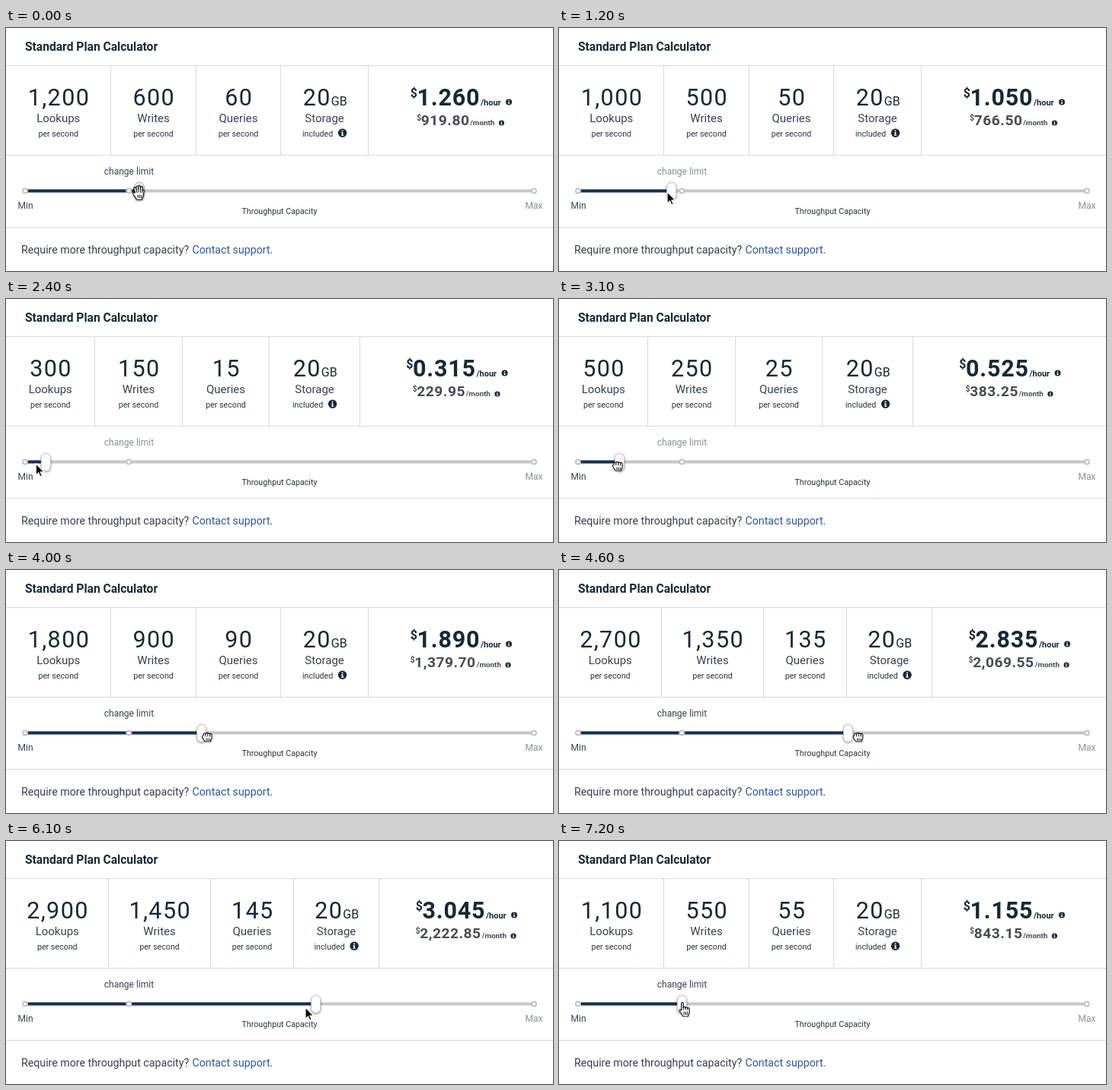
These frames come from a looping animation (718x320 px, 7.5 s). An HTML page:

```html
<!DOCTYPE html>
<html lang="en">
<head>
<meta charset="utf-8">
<title>Standard Plan Calculator</title>
<style>
  html, body { margin: 0; width: 718px; height: 320px; overflow: hidden; background: #fff; }
  svg { display: block; font-family: Roboto, "Open Sans", sans-serif; fill: #152934; }
  .rule { stroke: #d9d9d9; stroke-width: 1; }
  .mid { text-anchor: middle; }
  .big { font-size: 30.5px; letter-spacing: 1.4px; }
  .unit { font-size: 16px; letter-spacing: 0; }
  .label { font-size: 15px; fill: #33434c; }
  .small { font-size: 10.7px; fill: #26363f; }
  .bold { font-weight: 700; }
  .hour { font-size: 30.5px; letter-spacing: .8px; }
  .month { font-size: 19.2px; letter-spacing: .5px; }
  .grey { fill: #464d52; }
  .tick { font-size: 12px; fill: #33434c; }
  .foot { font-size: 14.2px; fill: #33404a; }
  .stop { fill: #fff; stroke: #c4c4c4; stroke-width: 2; }
  #thumb { fill: #fff; stroke: #c6c6c6; filter: drop-shadow(0 1.5px 1.5px rgba(0,0,0,.45)); }
  #cursor path { stroke-linejoin: round; stroke-linecap: round; }
  .hand { fill: #fff; stroke: #111; stroke-width: 1.2; }
  .crease { fill: none; stroke: #111; stroke-width: 1; }
  .arrow { fill: #000; stroke: #fff; stroke-width: 1.2; }
</style>
</head>
<body>
<svg width="718" height="320" viewBox="0 0 718 320">
  <defs>
    <g id="info">
      <circle r="5.5"/>
      <path d="M-1.5 -1H.8V2.3H1.7V3.3H-1.7V2.3H-.8V0H-1.5zM-.9 -3.6H.8V-2H-.9z" fill="#fff"/>
    </g>
  </defs>
  <path class="rule" d="M0 49.5H718M0 167.5H718M0 262.5H718"/>
  <text class="bold" x="25" y="30" font-size="15.6">Standard Plan Calculator</text>
  <g id="plan"></g>

  <text id="limit" class="tick mid" x="161.5" y="192.5">change limit</text>
  <path d="M25 214.5H693" stroke="#c6c6c6" stroke-width="4"/>
  <path id="fill" stroke="#123053" stroke-width="4"/>
  <circle class="stop" cx="25" cy="214.5" r="3"/>
  <circle class="stop" cx="161.3" cy="214.5" r="3"/>
  <circle class="stop" cx="693" cy="214.5" r="3"/>
  <text class="tick" x="15.5" y="237.5">Min</text>
  <text class="tick" x="704.5" y="237.5" text-anchor="end" style="fill:#8a8f93">Max</text>
  <text class="small mid" x="359" y="244.5">Throughput Capacity</text>
  <text class="foot" x="20" y="296.5">Require more throughput capacity?</text>
  <text class="foot" x="244.5" y="296.5"><tspan fill="#2c56a0">Contact support</tspan>.</text>

  <rect id="thumb" y="203.5" width="12" height="23" rx="6"/>
  <g id="cursor"></g>
</svg>
<script>
const LOOP = 7500, STEP = 100;
const $ = id => document.getElementById(id);

// time, lookups per second
const VALUES = [
  [0, 1200], [900, 1200], [1700, 700], [2500, 200], [2800, 200], [3100, 500],
  [3600, 1200], [4000, 1800], [4700, 2900], [4800, 2900], [5300, 3800],
  [5400, 3900], [5500, 3900], [6100, 2900], [6400, 1900], [6800, 1200],
  [7000, 1200], [7200, 1100], [7500, 1100]
];

// time, x, y, shape held from that time
const POINTER = [
  [0, 174, 217, 'open'], [100, 175, 218, 'closed'], [200, 174, 219, 'closed'],
  [900, 174, 219, 'closed'], [1000, 160, 216, 'arrow'], [1700, 97, 215, 'arrow'],
  [2500, 31, 217, 'arrow'], [2600, 38, 222, 'closed'], [2800, 38, 222, 'closed'],
  [3100, 77, 220, 'closed'], [4000, 264, 220, 'closed'], [4700, 414, 220, 'closed'],
  [4800, 414, 220, 'closed'], [4900, 434, 224, 'arrow'], [5300, 538, 233, 'arrow'],
  [5400, 552, 233, 'arrow'], [5500, 544, 231, 'arrow'], [6100, 393, 219, 'arrow'],
  [6400, 258, 219, 'arrow'], [6800, 169, 221, 'arrow'], [6900, 169, 221, 'arrow'],
  [7000, 168, 222, 'finger'], [7200, 165, 222, 'finger'], [7500, 165, 222, 'finger']
];

const hand = (outline, creases) =>
  `<path class="hand" d="${outline}"/><path class="crease" d="${creases}"/>`;

const SHAPES = {
  arrow: '<path class="arrow" d="M0 0V15.2L3.5 11.9L5.8 17.2L8.2 16.2L5.9 11H10.8z"/>',
  closed: hand('M-5 -3c0-2.5 2.6-2.5 2.8-.8c.2-2.4 2.8-2.4 3 0c.3-2 2.7-1.8 2.8.3' +
    'c.4-1.6 2.6-1.3 2.6.8v3.5c0 2-1.4 3-1.6 5.2h-7.6c-.4-2-3.4-3.4-3.4-6c0-1.8.8-2 1.4-2z',
    'M-2.2 -3.5v2.5M.8 -3.5v2.5M3.6 -3.2v2.4M-1 2v2.5M1.2 2v2.5M3.4 2v2.5'),
  open: hand('M-4.5 -1L-6.3 -5.5c-.6-1.8 1.7-2.6 2.4-.9L-2.8 -4.5L-3 -7.5c0-2 2.4-2 2.6 0' +
    'L-.2 -5V-8.3c0-2 2.6-2 2.6 0V-5L3 -7.2c.4-1.8 2.6-1.4 2.4.4L5 -3c.5-1.5 2.4-1 2.2.6' +
    'L6.4 3c-.4 2.6-1.6 3.4-1.8 6h-7.4c-.4-2.6-2.6-4-4.4-7.4c-1-2 1-2.8 2.2-1.4z',
    'M-2.8 -4.5l.6 4M-.2 -5v4.4M2.4 -5v4.4M5 -3l-.4 2.6M-1 3v3.5M1.2 3v3.5M3.4 3v3.5'),
  finger: hand('M-4.4 -8c0-1.8 2.6-1.8 2.6 0V-2.6c.4-1.4 2.6-1.2 2.8.3c.5-1.2 2.5-.9 2.7.6' +
    'c.5-1 2.5-.8 2.5 1.2V3c0 2.4-1.4 3.4-1.6 6h-7c-.4-2.4-2.6-3.8-4.4-7c-.9-1.8 1-2.7 2.4-1z',
    'M-1.8 -2.6v2.8M1 -2.3v2.5M3.7 -1.7v2M-1 3v3.5M1.2 3v3.5M3.4 3v3.5')
};

function sample(keys, t) {
  let i = keys.length - 2;
  while (i > 0 && keys[i][0] > t) i--;
  const a = keys[i], b = keys[i + 1];
  const k = (t - a[0]) / (b[0] - a[0]);
  return a.map((p, n) => typeof p === 'number' ? p + (b[n] - p) * k : p);
}

// Column borders follow the number of digits shown.
const borders = v => v < 1000 ? [0, 116.5, 231.5, 345.5, 464.5, 718]
  : v < 2000 ? [0, 137.5, 249.5, 360.5, 475.5, 718]
  : [0, 134.5, 268.5, 377.5, 489.5, 718];

const text = (cls, x, y, s, size) =>
  `<text class="${cls}" x="${x}" y="${y}"${size ? ` font-size="${size}"` : ''}>${s}</text>`;
const info = (x, y, r) =>
  `<use href="#info" transform="translate(${x} ${y}) scale(${r / 5.5})"/>`;
const comma = n => n.toLocaleString('en-US');

function metric(cx, value, name) {
  return text('big mid', cx + .7, 101.5, value) + text('label mid', cx, 124, name);
}

function price(cx, v) {
  const hour = v * .00105;
  const month = (hour * 730).toLocaleString('en-US',
    { minimumFractionDigits: 2, maximumFractionDigits: 2 });
  const width = [...month].reduce((w, c) => w + (/\d/.test(c) ? 11.5 : 5.7), 0);
  const h = cx - 66, m = cx - (width + 51.8) / 2;
  return text('bold', h, 91, '$', 16) +
    text('bold hour', h + 8.8, 101.5, hour.toFixed(3)) +
    text('bold', h + 92.2, 101.5, '/hour', 11) + info(h + 129.3, 97.5, 4) +
    text('bold grey', m, 122, '$', 10) +
    text('bold grey month', m + 5.6, 128, month) +
    text('bold grey', m + width + 6.7, 128, '/month', 9.9) +
    info(m + width + 48, 125, 3.6);
}

function plan(v) {
  const b = borders(v);
  const [c0, c1, c2, c3, c4] = b.slice(1).map((x, i) => (x + b[i]) / 2);
  const lines = b.slice(1, 5).map(x => `M${x} 50V167`).join('');
  return `<path class="rule" d="${lines}"/>` +
    metric(c0, comma(v), 'Lookups') +
    metric(c1, comma(v / 2), 'Writes') +
    metric(c2, comma(v / 20), 'Queries') +
    metric(c3, '20<tspan class="unit">GB</tspan>', 'Storage') +
    [c0, c1, c2].map(c => text('small mid', c, 143, 'per second')).join('') +
    text('small', c3 - 29, 143, 'included') + info(c3 + 23.6, 138.3, 5.7) +
    price(c4, v);
}

let shown = -1;
function draw(now) {
  const t = Math.floor((now % LOOP) / STEP) * STEP;
  if (t !== shown) {
    shown = t;
    const v = Math.round(sample(VALUES, t)[1] / 100) * 100;
    const x = 25 + (v - 100) * 668 / 4900;
    const [, px, py, shape] = sample(POINTER, t);
    $('plan').innerHTML = plan(v);
    $('limit').style.fill = v < 1100 ? '#8a8f93' : '#33434c';
    $('fill').setAttribute('d', `M25 214.5H${x}`);
    $('thumb').setAttribute('x', x - 6);
    $('thumb').style.stroke = t < 100 ? '#aaa' : '';
    $('cursor').innerHTML = SHAPES[shape];
    $('cursor').setAttribute('transform', `translate(${px} ${py})`);
  }
  requestAnimationFrame(() => draw(performance.now()));
}
draw(performance.now());
</script>
</body>
</html>
```
